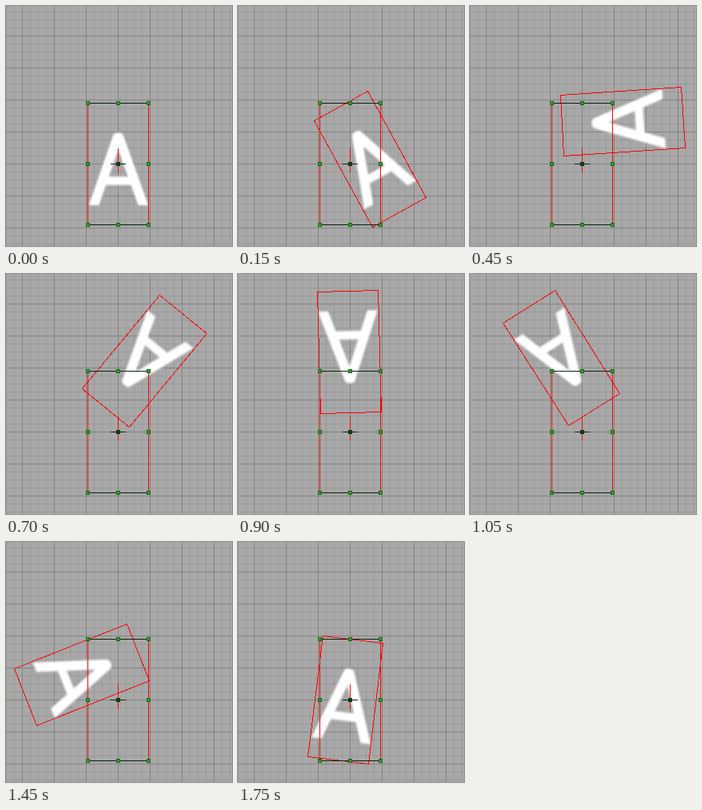
These frames come from a looping animation (283x300 px, 1.8 s). An HTML page:

```html
<!DOCTYPE html>
<html lang="en">
<head>
<meta charset="utf-8">
<title>Rotating letter</title>
<style>
  html, body { margin: 0; width: 100%; height: 100%; overflow: hidden; background: #a8a8a8; }
  svg { display: block; }
  .line { fill: none; stroke: #f00; stroke-width: 1; shape-rendering: crispEdges; }
  .dark { stroke: #0b220b; }
  .handle { fill: #4f8f45; stroke: #006f00; stroke-width: 1; shape-rendering: crispEdges; }
  .core { fill: #143c14; stroke: #003c00; }
  .minor { stroke: #999; }
  .major { stroke: #828282; }
</style>
</head>
<body>
<svg width="283" height="300" viewBox="0 0 283 300">
  <defs>
    <clipPath id="feet"><rect x="-45" y="-50" width="90" height="101.5"/></clipPath>
    <filter id="soft" x="-20%" y="-20%" width="140%" height="140%">
      <feGaussianBlur stdDeviation="0.8"/>
    </filter>
  </defs>
  <g id="grid"></g>
  <g id="letter" role="img" aria-label="A">
    <g filter="url(#soft)">
      <g clip-path="url(#feet)" fill="none" stroke="#fff" stroke-width="12" stroke-linejoin="round">
        <path d="M-32 56L-1 -33H1L33 56"/>
        <path d="M-22 21H22" stroke-width="10.5"/>
      </g>
    </g>
  </g>
  <path id="outline" class="line"/>
  <path class="line" d="M102.5 121.5V273.5M178.5 121.5V273.5M140.5 178V208"/>
  <path class="line dark" d="M102.5 121.5H178.5M102.5 273.5H178.5M131 197.5H150"/>
  <g id="handles"></g>
</svg>
<script>
const STEP = 50, COUNT = 36;
const PIVOT = { x: 140.5, y: 147.5 }, RADIUS = 50;
const HALF_W = 38, HALF_H = 76;
// [step, counter-clockwise degrees]
const TURNS = [[0, 0], [3, 28.8], [9, 93.6], [11, 108], [14, 140.4], [21, 212.4],
               [22, 219.6], [29, 291.6], [33, 332], [35, 353.1], [36, 360]];

const byId = id => document.getElementById(id);

function add(parent, tag, attrs) {
  const el = document.createElementNS("http://www.w3.org/2000/svg", tag);
  for (const key in attrs) el.setAttribute(key, attrs[key]);
  parent.appendChild(el);
}

function gridPath(first, gap) {
  let d = "";
  for (let x = first.x; x < 283; x += gap) d += `M${x + 0.5} 0V300`;
  for (let y = first.y; y < 300; y += gap) d += `M0 ${y + 0.5}H283`;
  return d;
}

add(byId("grid"), "path", { class: "line minor", d: gridPath({ x: 0, y: 7 }, 10) });
add(byId("grid"), "path", { class: "line major", d: gridPath({ x: 20, y: 37 }, 40) });

for (const y of [121, 197, 273]) {
  for (const x of [102, 140, 178]) {
    const core = x === 140 && y === 197;
    add(byId("handles"), "rect", {
      class: core ? "handle core" : "handle",
      x: x - 1.5, y: y - 1.5, width: 4, height: 4
    });
  }
}

function turnAt(step) {
  const i = TURNS.findIndex(([s]) => s > step);
  const [s0, a0] = TURNS[i - 1], [s1, a1] = TURNS[i];
  return a0 + (a1 - a0) * (step - s0) / (s1 - s0);
}

function draw(step) {
  const deg = turnAt(step), rad = deg * Math.PI / 180;
  const sin = Math.sin(rad), cos = Math.cos(rad);
  const x = PIVOT.x + RADIUS * sin + Math.min(1, Math.abs(sin) * 2.5);
  const y = PIVOT.y + RADIUS * cos;
  byId("letter").setAttribute("transform", `translate(${x} ${y}) rotate(${-deg})`);

  const corners = [[-1, -1], [1, -1], [1, 1], [-1, 1]].map(([i, j]) => {
    const u = i * HALF_W, v = j * HALF_H;
    const px = Math.floor(x + u * cos + v * sin) + 0.5;
    const py = Math.floor(y - u * sin + v * cos) + 0.5;
    return `${px} ${py}`;
  });
  byId("outline").setAttribute("d", `M${corners.join("L")}Z`);
}

const start = performance.now();
function tick() {
  draw(Math.floor((performance.now() - start) / STEP) % COUNT);
  requestAnimationFrame(tick);
}
tick();
</script>
</body>
</html>
```
